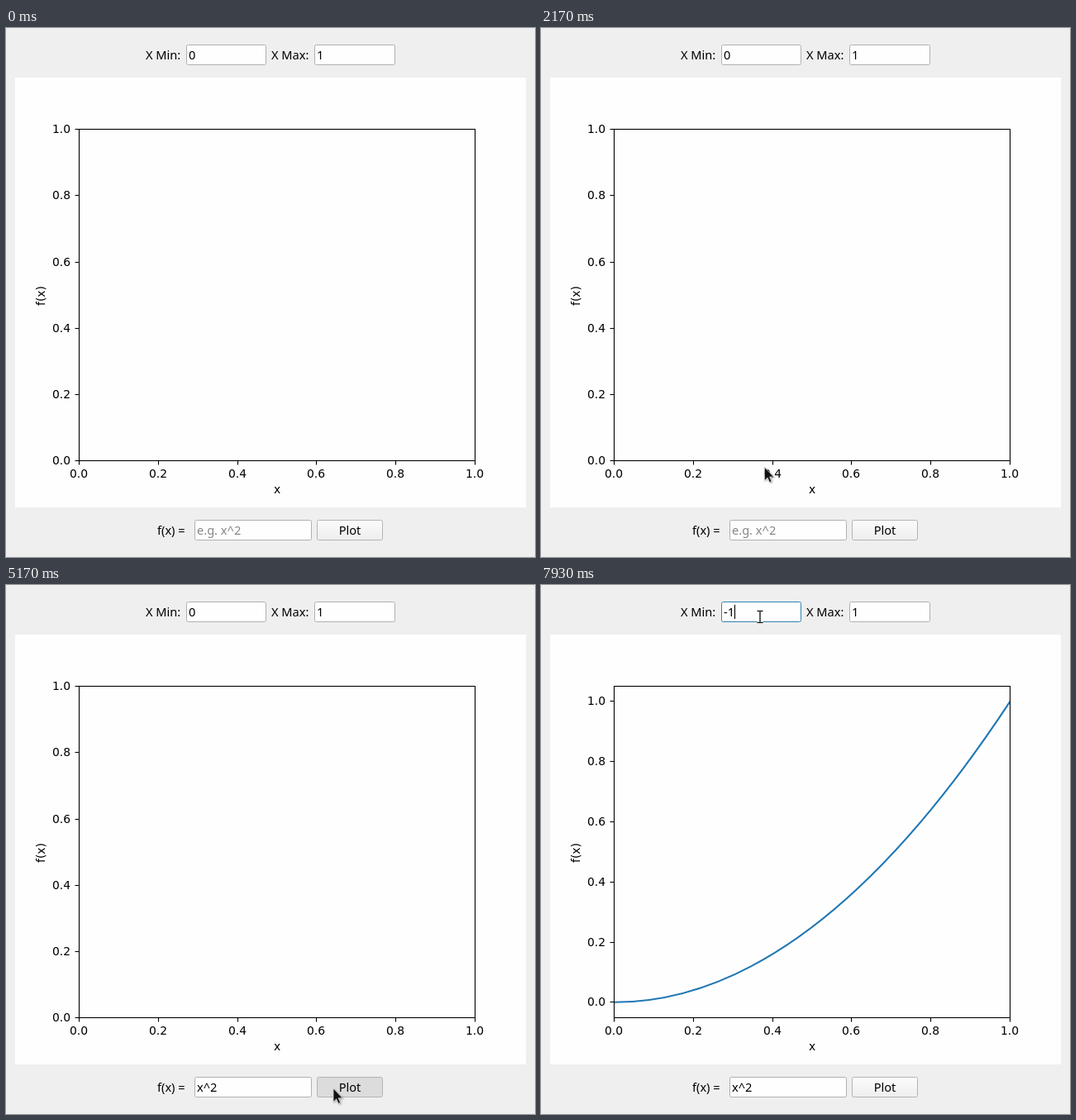
Animation, 640 px wide and 640 px high, one loop 8000 ms. Source, as an HTML page:

```html
<!DOCTYPE html>
<html lang="en">
<head>
<meta charset="utf-8">
<title>Function plotter</title>
<style>
  html, body { margin: 0; width: 100%; height: 100%; overflow: hidden; background: #efefef; }
  svg { display: block; width: 100vw; height: 100vh; }
  .ui { font: 14.6px "Noto Sans", "Open Sans", sans-serif; }
  .axis { font: 13.9px "DejaVu Sans", sans-serif; }
  .box { fill: #fefefe; stroke: #b0b0b0; }
  .box.focus { stroke: #3182b0; }
  .hint { fill: #868686; }
  .line { fill: none; stroke: #000; stroke-width: 1.1; }
</style>
</head>
<body>
<svg id="stage" viewBox="0 0 640 640">
  <defs>
    <linearGradient id="face" x2="0" y2="1">
      <stop stop-color="#fbfbfb"/><stop offset="1" stop-color="#eeeeee"/>
    </linearGradient>
  </defs>
  <rect width="640" height="640" fill="#efefef"/>
  <rect x="11" y="60" width="618" height="520" fill="#fefefe"/>
  <path id="curve" d="M88.5 504.8Q328 504.8 567.5 140.9" fill="none" stroke="#1f77b4" stroke-width="2.08"/>
  <rect class="line" x="88.5" y="122.5" width="479" height="401"/>
  <g id="xTicks" class="axis" text-anchor="middle"></g>
  <g id="yEmpty" class="axis" text-anchor="end"></g>
  <g id="yPlotted" class="axis" text-anchor="end"></g>
  <g class="axis" text-anchor="middle">
    <text x="328" y="563">x</text>
    <text transform="translate(47 324) rotate(-90)">f(x)</text>
  </g>
  <g class="ui">
    <text x="169" y="38">X Min:</text>
    <text x="321" y="38">X Max:</text>
    <text x="183" y="613">f(x) =</text>
    <rect id="minBox" class="box" x="218.5" y="20.5" width="96" height="24" rx="2"/>
    <rect class="box" x="373.5" y="20.5" width="97" height="24" rx="2"/>
    <rect id="fnBox" class="box" x="228.5" y="595.5" width="141" height="24" rx="2"/>
    <rect id="button" x="376.5" y="595.5" width="79" height="24" rx="2" stroke="#b4b4b4"/>
    <text id="minText" x="221" y="38"></text>
    <text x="376" y="38">1</text>
    <text id="fnText" x="231" y="613"></text>
    <text x="416" y="613" text-anchor="middle">Plot</text>
  </g>
  <path id="caret" class="line"/>
  <path id="arrow" d="M0 0V16.3L3.7 12.8 6.1 18.4 8.6 17.3 6.2 11.8H11.2Z" fill="#111" stroke="#dcdcdc" stroke-width=".8"
        style="filter:drop-shadow(1px 1px 1px #0005)"/>
  <g id="beam" fill="none">
    <path d="M-3.5 -7H3.5M0 -7V7M-3.5 7H3.5" stroke="#dcdcdc" stroke-width="3"/>
    <path d="M-3.5 -7H3.5M0 -7V7M-3.5 7H3.5" stroke="#111" stroke-width="1.2"/>
  </g>
</svg>
<script>
const LOOP = 8000;
const el = id => document.getElementById(id);
const show = (id, on) => el(id).style.display = on ? '' : 'none';

// Pointer waypoints: time, x, y
const pointerPath = [
  [870, 300, 16], [1330, 284, 404], [1700, 280, 440], [2530, 264, 592],
  [2620, 262, 615], [2720, 262, 607.5], [4480, 262, 607.5],
  [4960, 396, 609], [5950, 396, 609], [6430, 266, 48],
  [6580, 265, 38.5], [8000, 265, 38.5]
];
// Typed values: time, text
const fnSteps = [[0, ''], [3450, 'x'], [3850, 'x^'], [4250, 'x^2']];
const minSteps = [[0, '0'], [7150, ''], [7400, '-'], [7680, '-1']];

const FN_FOCUS = 2700, PRESS = 5110, RELEASE = 5240, MIN_FOCUS = 6780;

const latest = (steps, t) => steps.filter(s => s[0] <= t).pop();

function pointerAt(t) {
  const i = pointerPath.findIndex(p => p[0] > t);
  const [t0, x0, y0] = pointerPath[i - 1], [t1, x1, y1] = pointerPath[i];
  const k = (t - t0) / (t1 - t0), ease = k * k * (3 - 2 * k);
  return [x0 + (x1 - x0) * ease, y0 + (y1 - y0) * ease];
}

function addTicks(id, place) {
  let out = '';
  for (let i = 0; i <= 5; i++) out += place(i / 5, (i / 5).toFixed(1));
  el(id).innerHTML = out;
}
const yTick = (bottom, top) => (v, label) => {
  const y = Math.floor(bottom + (top - bottom) * v) + .5;
  return `<path class="line" d="M83.5 ${y}h5"/><text x="78" y="${y + 4.5}">${label}</text>`;
};
addTicks('xTicks', (v, label) => {
  const x = Math.round(88 + 479 * v) + .5;
  return `<path class="line" d="M${x} 523.5v5"/><text x="${x - .5}" y="544">${label}</text>`;
});
addTicks('yEmpty', yTick(523.5, 122.7));
addTicks('yPlotted', yTick(504.8, 140.9));

function placeCaret(t, steps, focusTime, text, y) {
  const since = t - Math.max(focusTime, latest(steps, t)[0]);
  const value = text.textContent;
  const width = value && !text.classList.contains('hint') ? text.getComputedTextLength() : 0;
  const x = Math.round(+text.getAttribute('x') + width) + .5;
  el('caret').setAttribute('d', `M${x} ${y}v17`);
  show('caret', since % 1200 < 600);
}

function draw(t) {
  const fnText = el('fnText'), minText = el('minText');
  const value = latest(fnSteps, t)[1];
  fnText.textContent = value || 'e.g. x^2';
  fnText.classList.toggle('hint', !value);
  minText.textContent = latest(minSteps, t)[1];

  const fnFocus = t >= FN_FOCUS && t < PRESS, minFocus = t >= MIN_FOCUS;
  el('fnBox').classList.toggle('focus', fnFocus);
  el('minBox').classList.toggle('focus', minFocus);
  el('button').setAttribute('fill', t >= PRESS && t < RELEASE ? '#dcdcdc' : 'url(#face)');

  const plotted = t >= RELEASE;
  show('curve', plotted);
  show('yPlotted', plotted);
  show('yEmpty', !plotted);

  if (fnFocus) placeCaret(t, fnSteps, FN_FOCUS, fnText, 599);
  else if (minFocus) placeCaret(t, minSteps, MIN_FOCUS, minText, 24);
  else show('caret', false);

  const visible = t >= pointerPath[0][0];
  let beam = false;
  if (visible) {
    const [x, y] = pointerAt(t);
    beam = (x > 228 && x < 370 && y > 595 && y < 620) ||
           (x > 218 && x < 315 && y > 20 && y < 45);
    el(beam ? 'beam' : 'arrow').setAttribute('transform', `translate(${x} ${y})`);
  }
  show('beam', beam);
  show('arrow', visible && !beam);
}

const start = performance.now();
function tick() {
  draw(Math.max(0, performance.now() - start) % LOOP);
  requestAnimationFrame(tick);
}
tick();
</script>
</body>
</html>
```
